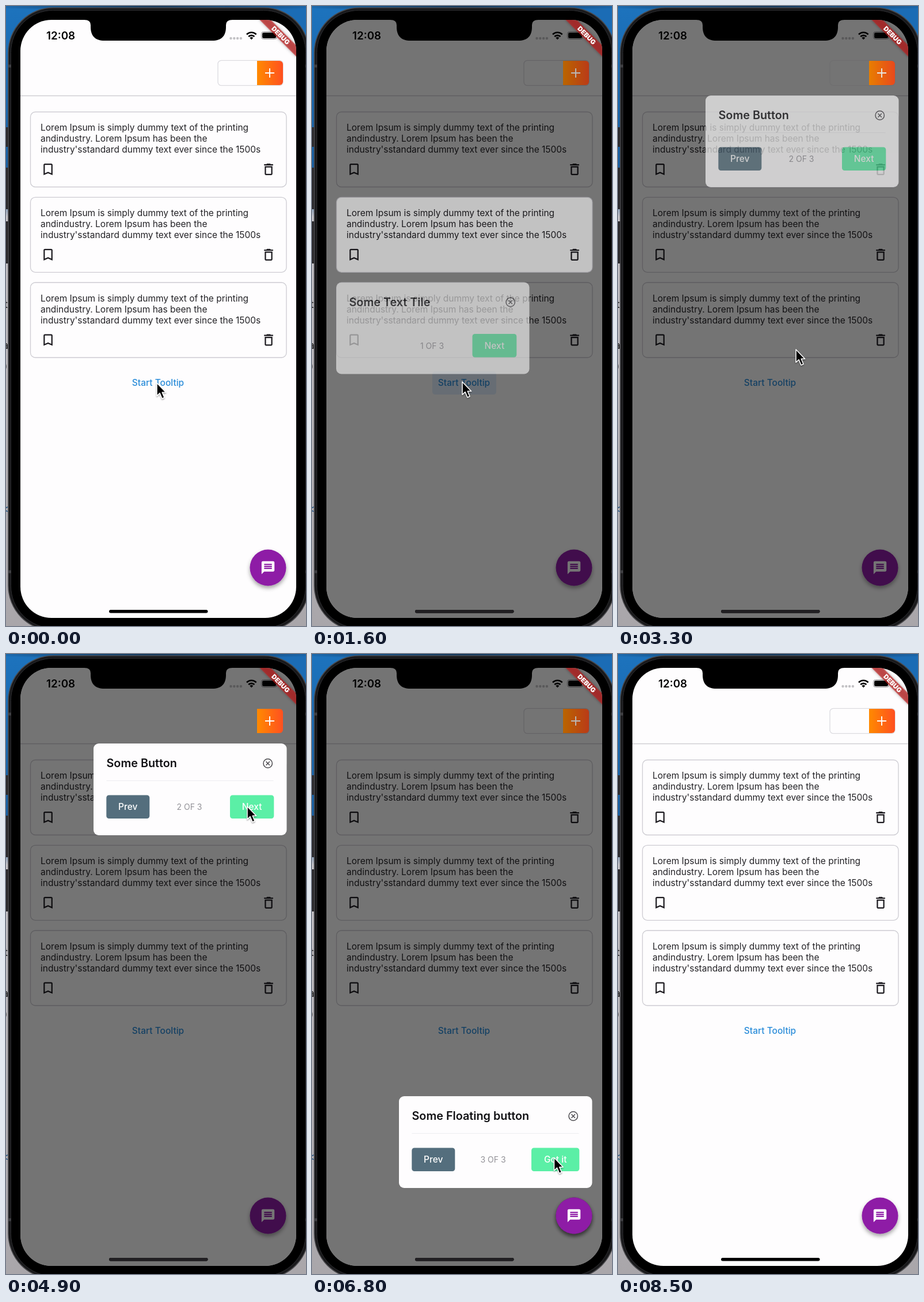
Animation of 521x1074 px, one loop 8600 ms. Source, as an HTML page:

```html
<!DOCTYPE html>
<html lang="en">
<head>
<meta charset="utf-8">
<title>Tooltip tour</title>
<style>
  html, body { margin: 0; width: 100%; height: 100%; overflow: hidden; background: #1b6cb5; }
  svg { display: block; width: 521px; height: 1074px; font-family: Inter, Roboto, sans-serif; }
</style>
</head>
<body>
<svg viewBox="0 0 521 1074" xmlns="http://www.w3.org/2000/svg">
  <defs>
    <linearGradient id="desk" x2="0" y2="1">
      <stop offset="0" stop-color="#1d73bd"/>
      <stop offset=".3" stop-color="#155b9d"/>
      <stop offset=".34" stop-color="#c4c2c6"/>
      <stop offset="1" stop-color="#a9a6aa"/>
    </linearGradient>
    <radialGradient id="topShade" cx=".5" cy="0" r=".6">
      <stop offset="0" stop-color="#12304e"/>
      <stop offset="1" stop-color="#12304e" stop-opacity="0"/>
    </radialGradient>
    <linearGradient id="orange">
      <stop offset="0" stop-color="#ff8a00"/>
      <stop offset="1" stop-color="#ff5020"/>
    </linearGradient>
    <filter id="soft" x="-50%" y="-50%" width="200%" height="200%">
      <feDropShadow dx="0" dy="4" stdDeviation="3.5" flood-opacity=".36"/>
    </filter>
    <filter id="bannerShadow" x="-30%" y="-80%" width="160%" height="260%">
      <feDropShadow dx="0" dy="0" stdDeviation="2.4" flood-opacity=".5"/>
    </filter>
    <filter id="pointerShadow" x="-50%" y="-50%" width="200%" height="200%">
      <feDropShadow dx="0" dy="1.5" stdDeviation="1.3" flood-opacity=".4"/>
    </filter>
    <clipPath id="screenClip"><rect x="25" y="24" width="479" height="1036" rx="54"/></clipPath>

    <g id="card">
      <rect x=".5" y=".5" width="444.5" height="130" rx="8.5" fill="#fefdfe" stroke="#cdccd2" stroke-width="1.3"/>
      <g font-size="15.5" fill="#232226">
        <text x="18" y="33">Lorem Ipsum is simply dummy text of the printing</text>
        <text x="18" y="52">andindustry. Lorem Ipsum has been the</text>
        <text x="18" y="71">industry'sstandard dummy text ever since the 1500s</text>
      </g>
      <path transform="translate(17.6 86.6) scale(1.119)" fill="#1d1b20"
        d="M17 3H7c-1.1 0-2 .9-2 2v16l7-3 7 3V5c0-1.1-.9-2-2-2zm0 15l-5-2.18L7 18V5h10v13z"/>
      <path transform="translate(400.6 86.6) scale(1.119)" fill="#1d1b20"
        d="M16 9v10H8V9h8m-1.5-6h-5l-1 1H5v2h14V4h-3.5l-1-1zM18 7H6v12c0 1.1.9 2 2 2h8c1.1 0 2-.9 2-2V7z"/>
    </g>
    <g id="fab">
      <circle cx="455" cy="973" r="31.5" fill="#8e1fa6" filter="url(#soft)"/>
      <path transform="translate(441.6 959.6) scale(1.119)" fill="#fff"
        d="M20 2H4c-1.1 0-1.99.9-1.99 2L2 22l4-4h14c1.1 0 2-.9 2-2V4c0-1.1-.9-2-2-2zm-2 12H6v-2h12v2zm0-3H6V9h12v2zm0-3H6V6h12v2z"/>
    </g>
  </defs>

  <!-- desktop behind the phone -->
  <rect width="521" height="1074" fill="url(#desk)"/>
  <rect x="380" width="141" height="400" fill="#1b6cb5"/>
  <rect width="521" height="14" fill="url(#topShade)"/>
  <g fill="#29282b">
    <rect y="210" width="5" height="34"/>
    <rect y="280" width="5" height="72"/>
    <rect y="373" width="5" height="73"/>
  </g>
  <g font-size="18" fill="#111">
    <text x="-3" y="523">t</text>
    <text x="-6" y="594">a</text>
    <text x="-4" y="630">)</text>
    <text x="-7" y="877" fill="#174e80">&lt;</text>
  </g>

  <!-- phone body -->
  <rect x="4" y="3" width="522" height="1079" rx="78" fill="#19191b" stroke="#4a4a4d" stroke-width="1.5"/>
  <rect x="8.5" y="7.5" width="512" height="1070" rx="73" stroke="#2d2d30"/>
  <path d="M4 104h5M4 980h5M520 104h5M520 980h5" stroke="#55565a" stroke-width="5" opacity=".6"/>

  <g clip-path="url(#screenClip)">
    <rect x="25" y="24" width="479" height="1036" fill="#fefdfe"/>
    <text x="70" y="58" font-size="18.8" font-weight="600">12:08</text>
    <g fill="#c3c2c5">
      <circle cx="390.5" cy="56" r="2.2"/><circle cx="396.3" cy="56" r="2.2"/>
      <circle cx="402.1" cy="56" r="2.2"/><circle cx="407.9" cy="56" r="2.2"/>
    </g>
    <g fill="none" stroke="#000" stroke-width="2.7">
      <path d="M418 49.2a11.7 11.7 0 0 1 16.6 0M421.2 53a7.2 7.2 0 0 1 10.2 0"/>
      <path d="M423.4 55.2a4.1 4.1 0 0 1 5.8 0l-2.9 3z" fill="#000" stroke="none"/>
    </g>
    <rect x="443.5" y="44.5" width="27" height="13" rx="4" fill="#fff" stroke="#8d8c90"/>
    <rect x="445" y="46" width="24" height="10" rx="2.7"/>
    <path d="M25 155.5H504" stroke="#cfced2" stroke-width="1.4"/>
    <rect id="field" x="368" y="94.3" width="113" height="43.4" rx="6" fill="none" stroke="#dcdbe0" stroke-width="1.3"/>
    <use href="#card" x="42" y="183"/>
    <use href="#card" x="42" y="330.8"/>
    <use href="#card" x="42" y="478.5"/>
    <rect id="ripple" x="209" y="633" width="111" height="40" rx="4.5" fill="#2196f3"/>
    <text x="264" y="658" font-size="15.5" font-weight="500" fill="#2a8cd9" text-anchor="middle">Start Tooltip</text>
    <use href="#fab"/>
    <rect x="179" y="1046" width="171.500" height="5.500" rx="2.75"/>

    <rect id="shade" x="25" y="24" width="479" height="1036" opacity=".54"/>
    <rect id="home" x="179" y="1046" width="171.500" height="5.500" rx="2.75" fill="#211f22"/>

    <path d="M436 95H475a6 6 0 0 1 6 6V131a6 6 0 0 1-6 6H436Z" fill="url(#orange)"/>
    <path d="M450 116H466M458 108V124" stroke="#fff" stroke-width="1.9"/>
    <path id="addShade" d="M436 95H475a6 6 0 0 1 6 6V131a6 6 0 0 1-6 6H436Z"/>

    <g id="steps"></g>

    <g transform="translate(504 24) rotate(45)">
      <rect x="-46" y="31.300" width="92" height="13.500" fill="#b71c1c" fill-opacity=".7" filter="url(#bannerShadow)"/>
      <text y="42.100" font-size="11.300" font-weight="900" fill="#fff" text-anchor="middle">DEBUG</text>
    </g>
  </g>
  <path d="M136 23H393V24Q382 24 382 33V36C382 52 374 60 358 60H171C155 60 147 52 147 36V33Q147 24 136 24Z"/>

  <path id="pointer" d="M0 0V22.300L5 17.600L9 27L13 25.200L9.200 16.200H15.600Z" stroke="#fff" stroke-width="1.500"
    stroke-linejoin="round" filter="url(#pointerShadow)"/>
</svg>

<script>
const LOOP = 8600;
const FADE = 350;
const END = 6980;
const $ = id => document.getElementById(id);
const clamp01 = v => Math.max(0, Math.min(1, v));
const smooth = v => v * v * (3 - 2 * v);

const steps = [
  { start: 1400, x: 42, y: 478.5, title: 'Some Text Tile', next: 'Next', nextX: 236.5,
    target: '<use href="#card" x="42" y="330.8"/>' },
  { start: 3070, x: 152, y: 155, title: 'Some Button', prev: true, next: 'Next', nextX: 237, target: '' },
  { start: 5080, x: 151, y: 766, title: 'Some Floating button', prev: true, next: 'Got it', nextX: 230,
    target: '<use href="#fab"/>' }
];

// time, x, y of the pointer tip
const pointerPath = [
  [0, 262, 653], [1000, 262, 653], [1400, 261, 651], [1850, 261, 651],
  [2700, 309, 595], [3450, 309, 595], [4400, 419, 264], [5300, 419, 264],
  [6350, 420.5, 872.5], [7300, 420.5, 872.5], [8100, 545, 900], [LOOP, 545, 900]
];

function button(x, width, label, fill) {
  return `<rect x="${x}" y="89.5" width="${width}" height="40.500" rx="4.500" fill="${fill}"/>
    <text x="${x + width / 2}" y="115" font-size="15.500" font-weight="500" fill="#fff" text-anchor="middle">${label}</text>`;
}

function tooltip(step, index) {
  return `<g opacity="0">${step.target}
    <g transform="translate(${step.x} ${step.y})">
      <rect width="335.500" height="159" rx="9" fill="#fefdfe"/>
      <text x="22.500" y="41" font-size="19.800" font-weight="600" fill="#111114">${step.title}</text>
      <g fill="none" stroke="#4b4a4e" stroke-width="1.500">
        <circle cx="302.700" cy="34.500" r="7.700"/>
        <path d="M299.500 31.300l6.400 6.400m0-6.400l-6.400 6.400"/>
      </g>
      <path d="M22.500 64.500H312.500" stroke="#ededf0"/>
      ${step.prev ? button(22.3, 75, 'Prev', '#546e7d') : ''}
      <text x="${index < 2 ? 166.5 : 163.5}" y="115" font-size="14" fill="#939298" text-anchor="middle">${index + 1} OF 3</text>
      ${button(step.nextX, 313.3 - step.nextX, step.next, '#5befa6')}
    </g></g>`;
}

$('steps').innerHTML = steps.map(tooltip).join('');
const groups = [...$('steps').children];

function pointerAt(t) {
  const i = pointerPath.findIndex(key => key[0] > t);
  const [t0, x0, y0] = pointerPath[i - 1];
  const [t1, x1, y1] = pointerPath[i];
  const k = smooth((t - t0) / (t1 - t0));
  return [x0 + (x1 - x0) * k, y0 + (y1 - y0) * k];
}

function render(t) {
  const touring = t >= steps[0].start && t < END;
  const fades = steps.map((step, i) => {
    const end = i < 2 ? steps[i + 1].start : END;
    return t >= step.start && t < end ? clamp01((t - step.start) / FADE) : 0;
  });
  groups.forEach((group, i) => group.setAttribute('opacity', fades[i]));
  $('shade').setAttribute('opacity', touring ? 0.54 : 0);
  $('home').setAttribute('opacity', touring ? 1 : 0);
  $('addShade').setAttribute('opacity', touring ? 0.27 * (1 - fades[1]) : 0);
  $('field').setAttribute('opacity', 1 - fades[1]);
  const ripple = clamp01((t - 1250) / 150) * clamp01((1850 - t) / 200);
  $('ripple').setAttribute('opacity', 0.13 * ripple);
  $('pointer').setAttribute('transform', `translate(${pointerAt(t)})`);
}

function tick(now) {
  render(now % LOOP);
  requestAnimationFrame(tick);
}
render(0);
requestAnimationFrame(tick);
</script>
</body>
</html>
```
